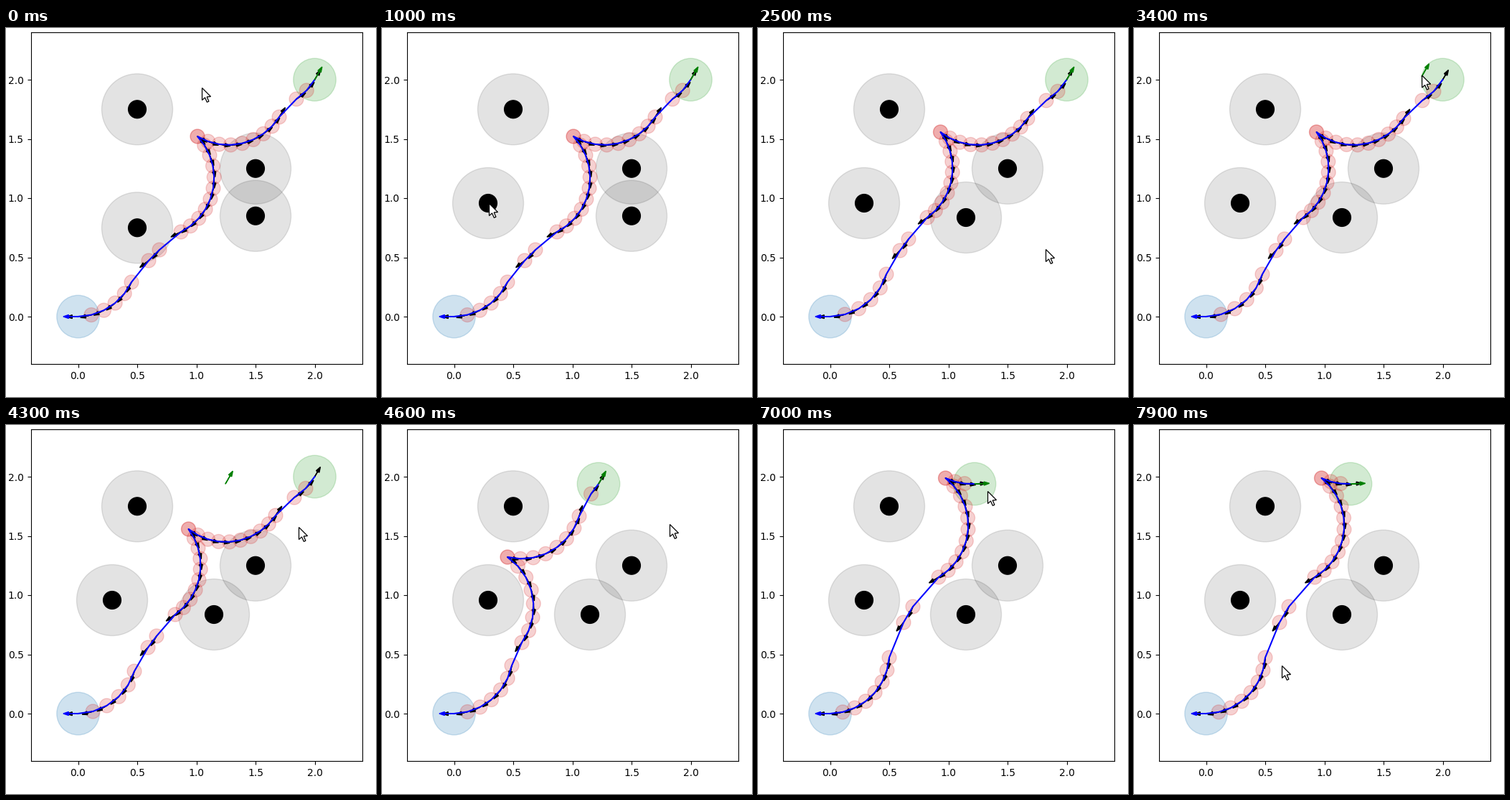
These frames come from a looping animation (516 by 514 pixels, 8 s). A matplotlib script:

```python
import matplotlib.pyplot as plt
import numpy as np
from matplotlib.animation import FuncAnimation
from matplotlib.patches import Circle, FancyArrow, Polygon

W, H, DPI = 516, 514, 100
STEPS, INTERVAL = 80, 100
UNIT = 165             # pixels per axis unit
ORIGIN = 100.5 + 402j  # stage points are complex, with y pointing down
TURN_RADIUS = 84
TINT = 0.21


def at(x, y):
    return ORIGIN + UNIT * complex(x, -y)


def xy(p):
    return p.real, p.imag


START, GOAL_A, GOAL_B = at(0, 0), at(2, 2), 302 + 82j
OBSTACLES = [at(0.5, 1.75), at(0.5, 0.75), at(1.5, 1.25), at(1.5, 0.85)]

# Pointer moves: first step, last step, where it ends.
MOVES = [
    (2, 3, 208 + 235j), (5, 6, 183 + 265j), (8, 10, 149 + 244j),
    (11, 13, 410 + 335j), (15, 15, 481 + 338j), (16, 17, 388 + 269j),
    (19, 20, 355 + 266j), (21, 23, 290 + 264j), (25, 25, 401 + 308j),
    (28, 32, 425 + 62j), (34, 38, 306 + 80j), (43, 43, 408 + 142j),
    (44, 46, 401 + 138j), (48, 48, 339 + 103j), (50, 50, 324 + 92j),
    (60, 61, 320 + 92j), (77, 79, 206 + 335j),
]
POINTER = np.array([(0, 0), (0, 17), (4, 13.4), (6.8, 19.8), (9.4, 18.7),
                    (6.7, 12.4), (12, 12)]) + 0.5


def pointer_at(step):
    pos = 273 + 83j
    for first, last, target in MOVES:
        if step >= first:
            part = min(1, (step - first + 1) / (last - first + 1))
            pos += part * (target - pos)
    return pos


def dragged(step, home, first, last):
    return home if step < first else pointer_at(min(step, last))


def arc(a, b, count):
    """Evenly spaced positions and directions along a left-hand arc."""
    chord = np.conj(b - a)
    turn = 2 * np.arcsin(abs(chord) / (2 * TURN_RADIUS))
    first = np.angle(chord) - turn / 2
    angle = first + np.linspace(0, turn, count)
    path = TURN_RADIUS * (np.exp(1j * angle) - np.exp(1j * first)) / 1j
    return a + np.conj(path), angle


def add_disc(center, radius, color, alpha=1, z=1):
    return stage.add_patch(Circle(xy(center), radius * UNIT, color=color,
                                  alpha=alpha, zorder=z))


def vector(angle, length):
    return {"dx": length * UNIT * np.cos(angle),
            "dy": -length * UNIT * np.sin(angle)}


def add_arrow(p, angle, length, color, z):
    return stage.add_patch(FancyArrow(
        *xy(p), **vector(angle, length), width=0.001 * UNIT,
        head_width=0.03 * UNIT, head_length=0.045 * UNIT,
        color=color, zorder=z))


def build_plan(back, cusp, ahead, goal, counts):
    """Reverse from START to the cusp, then drive forward to the goal.

    Points pair up as the two ends of each arc.
    """
    ends = [START, *back, cusp, cusp, *ahead, goal]
    reverse_runs = len(back) // 2 + 1
    places, headings = [], []
    for k, count in enumerate(counts):
        p, angle = arc(ends[2 * k], ends[2 * k + 1], count)
        places.extend(p)
        headings.extend(angle + np.pi * (k < reverse_runs))
    parts = [add_disc(p, 0.06, "tab:red", TINT, 2) for p in places[1:-1]]
    parts += [add_arrow(p, a, 0.05, "k", 3) for p, a in zip(places, headings)]
    parts += stage.plot(np.real(places), np.imag(places), "b", lw=1.5,
                        zorder=4)
    return parts


fig = plt.figure(figsize=(W / DPI, H / DPI), dpi=DPI, facecolor="white")
frame = fig.add_axes([34.501 / W, 46 / H, 462 / W, 462 / H])
frame.set(xlim=(-0.4, 2.4), ylim=(-0.4, 2.4),
          xticks=np.arange(0, 2.1, 0.5), yticks=np.arange(0, 2.1, 0.5))

# Overlay whose units are stage pixels.
stage = fig.add_axes([0, 0, 1, 1], zorder=2)
stage.axis("off")

halos = [add_disc(p, 0.3, "k", 0.11) for p in OBSTACLES]
cores = [add_disc(p, 0.075, "k") for p in OBSTACLES]
add_disc(START, 0.18, "tab:blue", TINT)
goal_zone = add_disc(GOAL_A, 0.18, "tab:green", TINT)

wide = np.array([175 + 354j, 199 + 324j, 214 + 309j, 244 + 284j,
                 267 + 151j, 381 + 124j, 405 + 99j])
tight = np.array([179 + 343j, 198 + 310j, 210 + 294j, 236 + 264j,
                  254.5 + 145j, 376 + 126j, 402 + 101j])
nudged = wide + 0.15 * (tight - wide)

# Step at which each plan appears.
plans = {
    0: build_plan(wide[:4], wide[4], wide[5:], GOAL_A, (6, 2, 11, 9, 3)),
    12: build_plan(nudged[:4], nudged[4], nudged[5:], GOAL_A,
                   (6, 2, 11, 9, 3)),
    25: build_plan(tight[:4], tight[4], tight[5:], GOAL_A,
                   (6, 2, 10, 10, 3)),
    44: build_plan([181 + 335j, 195 + 303j], 175 + 184j,
                   [275 + 127j, 291.5 + 96j], GOAL_B, (7, 8, 8, 2)),
    70: build_plan([183 + 324j, 203 + 275j, 216 + 253j, 252 + 212j],
                   261.5 + 74j, [], GOAL_B, (8, 2, 11, 4)),
}

add_arrow(START, np.pi, 0.08, "b", 5)
goal_arrow = add_arrow(GOAL_A, np.pi / 3, 0.08, "g", 5)
pointer = stage.add_patch(Polygon(POINTER, facecolor="white", edgecolor="k",
                                  lw=0.9, zorder=6))
stage.set(xlim=(0, W), ylim=(H, 0))


def place_obstacle(index, p):
    halos[index].center = cores[index].center = xy(p)


def draw(step):
    pointer.set_xy(POINTER + xy(pointer_at(step)))
    place_obstacle(1, dragged(step, OBSTACLES[1], 8, 10) - (step >= 8))
    place_obstacle(3, dragged(step, OBSTACLES[3], 21, 23))

    goal = GOAL_A if step < 44 else GOAL_B
    goal_zone.center = xy(goal)
    if step < 44:
        goal = dragged(step, GOAL_A, 34, 38) + 2j * (step >= 34)
    heading = np.radians(60 if step < 60 else 42 if step < 65 else 2)
    goal_arrow.set_data(x=goal.real, y=goal.imag, **vector(heading, 0.08))

    current = max(first for first in plans if first <= step)
    for first, parts in plans.items():
        for part in parts:
            part.set_visible(first == current)
    return []


anim = FuncAnimation(fig, draw, frames=STEPS, interval=INTERVAL,
                     repeat=True, repeat_delay=0, blit=False)
plt.show()
```
